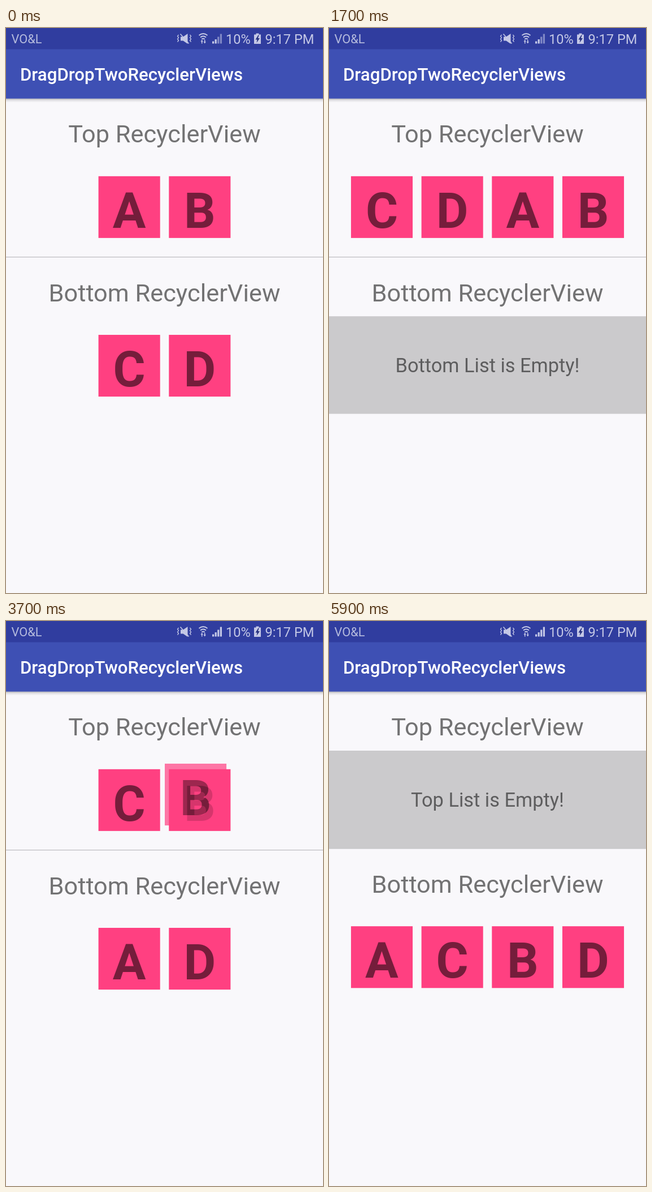
Recreate the animation shown at these times as an HTML page. Size 561 by 998 pixels, loop 6 s.

```html
<!DOCTYPE html>
<html lang="en">
<head>
<meta charset="utf-8">
<title>Drag and drop between two lists</title>
<style>
  html, body { margin: 0; width: 100%; height: 100%; overflow: hidden; background: #f9f8fb; }
  svg { display: block; width: 100vw; height: 100vh; font-family: Roboto, sans-serif; }
  .heading { font-size: 43.3px; fill-opacity: .54; text-anchor: middle; }
  .empty { font-size: 34.4px; fill-opacity: .54; text-anchor: middle; }
  .letter { font-size: 87.26px; font-weight: 700; fill-opacity: .54; text-anchor: middle; }
  .status { fill: #c4c8e6; font-size: 23.6px; }
  .line { fill: none; stroke: #c4c8e6; }
</style>
</head>
<body>
<svg viewBox="0 0 561 998">
  <defs>
    <linearGradient id="shade" x2="0" y2="1">
      <stop stop-opacity=".3"/>
      <stop offset=".4" stop-opacity=".1"/>
      <stop offset="1" stop-opacity="0"/>
    </linearGradient>
  </defs>
  <rect width="561" height="998" fill="#f9f8fb"/>
  <rect y="124.5" width="561" height="7" fill="url(#shade)"/>
  <rect width="561" height="38" fill="#303d9f"/>
  <rect y="37.5" width="561" height="87.2" fill="#3e50b4"/>

  <g class="status">
    <text x="9.5" y="27" font-size="21.8" fill="#b4badd">VO&amp;L</text>
    <text x="389" y="27.5">10%</text>
    <text x="458.6" y="27.5">9:17 PM</text>
    <path d="M309 15.5h4.500l8-5.500v18l-8-5.500h-4.500z"/>
    <path class="line" stroke-width="1.600" d="M308.500 10.500l15 17"/>
    <path class="line" stroke-width="1.300" d="M305.500 12l-2 2.500 2 2.500-2 2.500 2 2.500-2 2.500M325.500 12l2 2.500-2 2.500 2 2.500-2 2.500 2 2.500"/>
    <path class="line" stroke-width="1.900" d="M341.500 13q7.500-6 15 0M344 16.500q5-4 10 0M346.300 19.800q2.700-2.200 5.400 0"/>
    <path id="arrows" d="M344.500 24l2.200-3.200 2.200 3.200h-1.400v3.500h-1.600v-3.500zM349.500 24.300h1.400v-3.300h1.600v3.300h1.400l-2.200 3.300z"/>
    <path d="M365 23.500h3.200v4h-3.200zM369.600 20h3.200v7.500h-3.200z"/>
    <path id="bars" d="M374.200 15.500h3.200v12h-3.200zM378.800 10.500h3.200v17h-3.200z"/>
    <path d="M442.500 9.500h5v2h3.500v16.500h-12v-16.500h3.500z"/>
    <path fill="#26307f" d="M446.500 12.500l-5 8h3l-1 5.500 5.500-8h-3.200l2-5.500z"/>
  </g>
  <text x="25" y="93.400" font-size="31.170" font-weight="500" fill="#fff">DragDropTwoRecyclerViews</text>

  <text class="heading" x="280.5" y="202.300">Top RecyclerView</text>
  <g id="top"></g>
  <g id="lower">
    <rect y="403.900" width="561" height="1.400" fill="#c3c2c5"/>
    <text class="heading" x="280.5" y="482.500">Bottom RecyclerView</text>
    <g id="bottom" transform="translate(0 280.200)"></g>
  </g>
  <g id="ghost" opacity=".7"></g>
</svg>
<script>
const LOOP = 6000, STEP = 100;
const SIZE = 109.08, PITCH = 124.67, MID = 280.5, ROW = 261.8;
const HIGH = 252, LOW = 532;

// start time, top list, bottom list
const lists = [
  [0, "AB", "CD"],
  [800, "CAB", "D"],
  [1700, "CDAB", ""],
  [2600, "CAB", "D"],
  [3500, "CB", "AD"],
  [4200, "C", "ABD"],
  [5100, "", "ACBD"],
];

// first and last time, letter, then x and y at both ends
const drags = [
  [400, 700, "C", 158, LOW, 179.6, HIGH],
  [1300, 1600, "D", 220, LOW, 236, HIGH],
  [2100, 2500, "D", 160, HIGH, 214.3, LOW],
  [2900, 3400, "A", 222, HIGH, 230, LOW],
  [3700, 4100, "B", 281, HIGH, 292, LOW],
  [4500, 5000, "C", 234, HIGH, 241, LOW],
];

const el = id => document.getElementById(id);

const tile = (letter, x, y) =>
  `<g transform="translate(${x} ${y})"><rect width="${SIZE}" height="${SIZE}" fill="#ff4081"/>` +
  `<text class="letter" x="${SIZE / 2}" y="91">${letter}</text></g>`;

const emptyBox = name =>
  `<rect y="229" width="561" height="172.300" fill="#cbcacc"/>` +
  `<text class="empty" x="${MID}" y="328.300">${name} List is Empty!</text>`;

function row(letters, name) {
  if (!letters) return emptyBox(name);
  const left = MID - ((letters.length - 1) * PITCH + SIZE) / 2;
  return [...letters].map((c, i) => tile(c, left + i * PITCH, ROW)).join("");
}

function ghost(t) {
  const drag = drags.find(d => t >= d[0] && t <= d[1]);
  if (!drag) return "";
  const [from, to, letter, x0, y0, x1, y1] = drag;
  const p = 1 - (1 - (t - from) / (to - from)) ** 1.1;
  return tile(letter, x0 + (x1 - x0) * p, y0 + (y1 - y0) * p);
}

function draw(t) {
  const [, top, bottom] = lists.findLast(s => t >= s[0]);
  el("top").innerHTML = row(top, "Top");
  el("bottom").innerHTML = row(bottom, "Bottom");
  el("lower").setAttribute("transform", `translate(0 ${top ? 0 : -2.8})`);
  el("ghost").innerHTML = ghost(t);
  el("bars").setAttribute("opacity", t < 2900 ? .55 : 1);
  el("arrows").setAttribute("opacity", t >= 4500 && t < 5500 ? .4 : 1);
}

const begin = performance.now();
let shown = -1;

function tick() {
  const t = Math.floor((performance.now() - begin) % LOOP / STEP) * STEP;
  if (t !== shown) draw(shown = t);
  requestAnimationFrame(tick);
}
tick();
</script>
</body>
</html>
```
